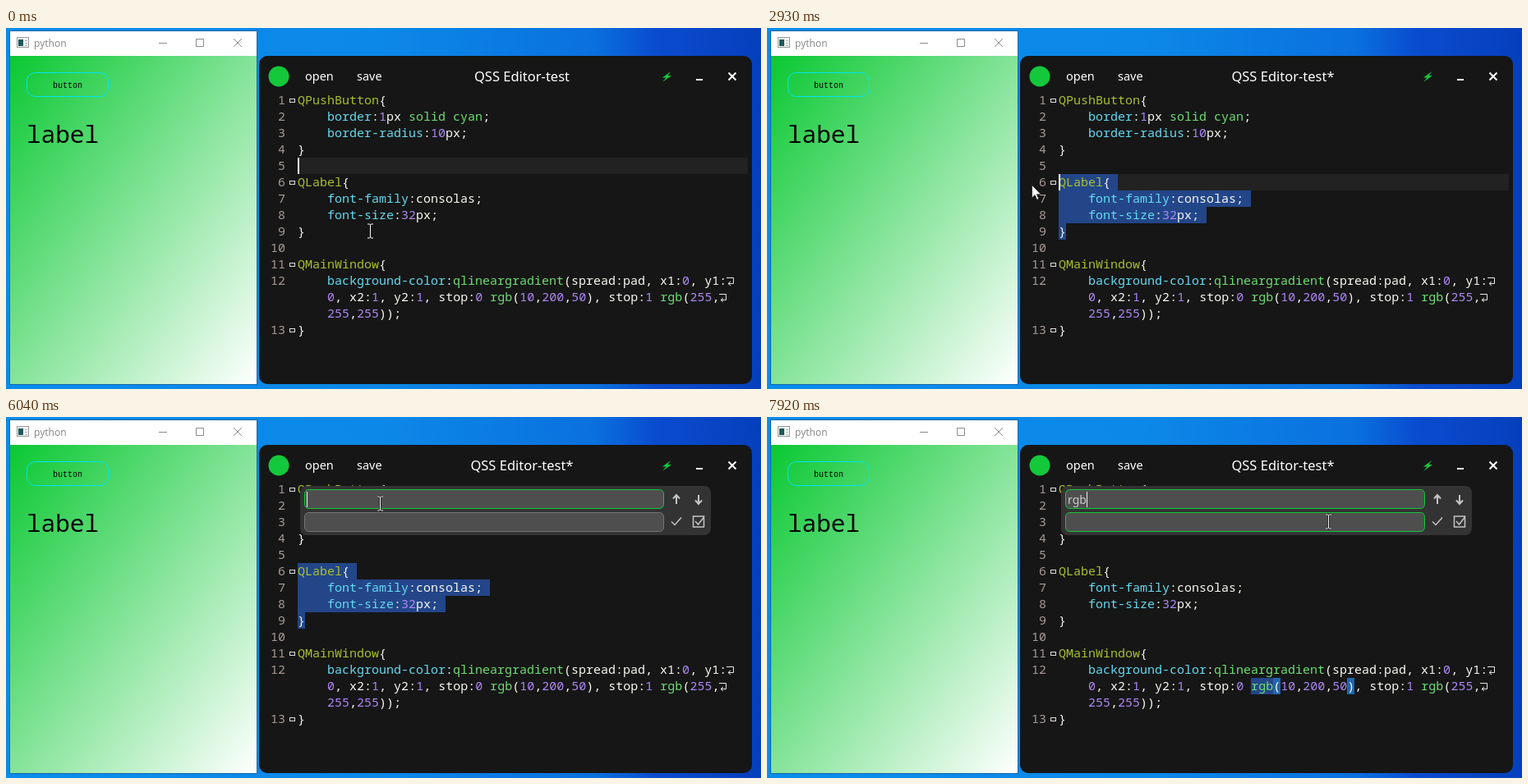
Animation, 919 px wide and 440 px high, one loop 7.99 s. Source, as an HTML page:

```html
<!DOCTYPE html>
<html lang="en">
<head>
<meta charset="utf-8">
<title>QSS Editor</title>
<style>
  html, body { margin: 0; width: 100%; height: 100%; overflow: hidden; background: #0a7fe0; }
  svg { display: block; width: 919px; height: 440px; }
  text { white-space: pre; }
  .code { font: 15px "Noto Sans Mono", monospace; fill: #f8f8f2; }
  .num { fill: #a89a96; text-anchor: end; }
  .ui { font-family: "Noto Sans", "Open Sans", sans-serif; fill: #fff; }
  .small { font: 10px "Liberation Mono", monospace; }
  .big { font: 29.33px "Noto Sans Mono", monospace; }
  .ime { font: 19px "Noto Sans CJK SC", "Noto Sans CJK", sans-serif; fill: #111; }
  .line { fill: none; }
  .comment { fill: #7b7768; }
</style>
</head>
<body>
<svg viewBox="0 0 919 440" xmlns="http://www.w3.org/2000/svg">
  <defs>
    <linearGradient id="sky">
      <stop offset="0" stop-color="#0a8cec"/>
      <stop offset=".5" stop-color="#0c88e8"/>
      <stop offset=".78" stop-color="#0a70de"/>
      <stop offset=".86" stop-color="#0a4ccf"/>
      <stop offset="1" stop-color="#063fbc"/>
    </linearGradient>
    <linearGradient id="form" x2="1" y2="1">
      <stop stop-color="rgb(10,200,50)"/>
      <stop offset="1" stop-color="#fff"/>
    </linearGradient>
  </defs>

  <rect width="919" height="440" fill="url(#sky)"/>

  <!-- preview window -->
  <rect x="4" y="3" width="302" height="432" fill="#1668a8"/>
  <rect x="5" y="4" width="300" height="30" fill="#fff"/>
  <rect x="5" y="34" width="300" height="400" fill="url(#form)"/>
  <g shape-rendering="crispEdges">
    <rect x="13.5" y="11.5" width="14" height="12" fill="#f4f4f4" stroke="#9a9a9a"/>
    <rect x="15" y="14" width="6" height="8" fill="#1d5a5c"/>
    <path d="M23 15h3M23 18h3M23 21h3" stroke="#b5b5b5"/>
  </g>
  <text class="ui" x="34" y="23" style="font-size:12px;fill:#8c8c8c">python</text>
  <path class="line" d="M186 18.5h10M231.5 13.5h9v9h-9zM277 13l10 10M287 13l-10 10" stroke="#8a8a8a"/>
  <rect class="line" x="25.5" y="54.5" width="99" height="29" rx="10" stroke="#00e5f0"/>
  <text class="small" x="57" y="73">button</text>
  <text class="big" id="bigLabel" x="25" y="140">label</text>
  <text class="small" id="smallLabel" x="25" y="133">label</text>

  <!-- editor window -->
  <rect x="308" y="34" width="600" height="400" rx="10" fill="#161616"/>
  <circle cx="332" cy="59" r="12.5" fill="#14c83c"/>
  <g class="ui" font-size="14.5">
    <text x="364" y="64">open</text>
    <text x="427" y="64">save</text>
    <text id="title" x="628" y="65" text-anchor="middle" font-size="16.5"></text>
  </g>
  <path d="M809 53l-10 7.500h4.500l-4.500 5.500 11-8h-4.500z" fill="#14c83c"/>
  <path class="line" d="M840 63h8M879.500 54.500l9 9M888.500 54.500l-9 9" stroke="#fff" stroke-width="2"/>

  <rect id="rowBar" x="355" width="548" height="20" fill="#222"/>
  <g id="selection" fill="#234689"></g>
  <g id="match">
    <path d="M589 318h27v20h-27z" fill="#234689"/>
    <path d="M616 318h9v20h-9zM706 318h9v20h-9z" fill="#1f67b0"/>
  </g>
  <g id="sheet" class="code"></g>
  <g id="rule" class="code"></g>
  <g id="commented" class="code comment"></g>
  <path class="line" d="M877 304.500h8.500v7h-6M882 309l-3 2.500 3 2.500M868 324.500h8.500v7h-6M873 329l-3 2.500 3 2.500" stroke="#e8e8e8"/>
  <rect id="caret" x="355" width="2" height="20" fill="#fff"/>

  <!-- find and replace -->
  <g id="panel">
    <rect x="358" y="84" width="500" height="60" rx="8" fill="#333"/>
    <rect x="363.500" y="88.500" width="437" height="23" rx="5" fill="#4e4e4e" stroke="#14c83c"/>
    <rect id="field2" x="363.500" y="116.500" width="437" height="23" rx="5" fill="#4e4e4e"/>
    <g class="line" stroke="#c4c4c4" stroke-width="2">
      <path d="M816 106v-11M812 99.500l4-4.500 4 4.500M843 95v11M839 101.500l4 4.500 4-4.500"/>
      <path d="M810 127.500l4 4 8-9" stroke-width="1.500"/>
      <path d="M836.500 121h13v13h-13zM839 127l3.500 4 7-9" stroke-width="1.500"/>
    </g>
    <text id="query" class="ui" x="366" y="106" style="font-size:14px;fill:#ccc"></text>
    <path id="underline" stroke="#9aa4b4"/>
    <rect id="caret2" y="91" width="1" height="19" fill="#eee"/>
  </g>
  <g id="ime"></g>

  <!-- pointer -->
  <g id="pointer">
    <circle id="press" cx="-2" cy="-1" r="12" fill="#ff0" fill-opacity=".5"/>
    <g id="beam" class="line">
      <path d="M-3.500-8.500h2.500l1 1 1-1h2.500M0-7.500v15M-3.500 8.500h2.500l1-1 1 1h2.500" stroke="#222" stroke-width="2.500"/>
      <path d="M-3.500-8.500h2.500l1 1 1-1h2.500M0-7.500v15M-3.500 8.500h2.500l1-1 1 1h2.500" stroke="#f2f2f2"/>
    </g>
    <path id="arrow" d="M0 0v15.500l3.600-3.400 2.500 5.700 2.300-1-2.500-5.500h5z" fill="#fff" stroke="#222" stroke-width=".8"/>
  </g>
</svg>

<script>
const LOOP = 7990, LEFT = 355, CHAR = 9, TOP = 78, ROW = 20;
const $ = id => document.getElementById(id);
const show = (id, on) => $(id).style.display = on ? '' : 'none';
const rowTop = row => TOP + (row - 1) * ROW;

const sheet = [
  'QPushButton{', '    border:1px solid cyan;', '    border-radius:10px;', '}', '',
  'QLabel{', '    font-family:consolas;', '    font-size:32px;', '}', '',
  'QMainWindow{',
  '    background-color:qlineargradient(spread:pad, x1:0, y1:',
  '    0, x2:1, y2:1, stop:0 rgb(10,200,50), stop:1 rgb(255,',
  '    255,255));', '}'
];
const muted = ['/*QLabel{*/', '/*  font-family:consolas;*/', '/*  font-size:32px;*/', '/*}*/'];

const TOKEN = /(Q\w+)|(border-radius|border|font-family|font-size|background-color)|(solid|cyan|qlineargradient|rgb)|([xy]\d)|(\d+)/g;
const COLORS = ['#a9bf30', '#66d9ef', '#6fdc74', '#f8f8f2', '#ae88f5'];
const paint = line => line.replace(TOKEN, (word, ...groups) =>
  `<tspan fill="${COLORS[groups.slice(0, 5).findIndex(Boolean)]}">${word}</tspan>`);
const codeText = (html, row) => `<text x="${LEFT}" y="${rowTop(row) + 15}">${html}</text>`;

function buildEditor() {
  let number = 0, fixed = '', rule = '';
  sheet.forEach((line, i) => {
    const row = i + 1, y = rowTop(row);
    if (row < 13 || row > 14) fixed += `<text class="num" x="340" y="${y + 15}">${++number}</text>`;
    if (line[0] === 'Q' || row === 15)
      fixed += `<rect class="line" x="345.500" y="${y + 8.5}" width="6" height="4" stroke="#ddd"/>`;
    if (row > 5 && row < 10) rule += codeText(paint(line), row);
    else fixed += codeText(paint(line), row);
  });
  $('sheet').innerHTML = fixed;
  $('rule').innerHTML = rule;
  $('commented').innerHTML = muted.map((line, i) => codeText(line, i + 6)).join('');
}

// Candidate bar: words laid out at an even pitch after the typed letters.
function candidateBar(words, pitch, right) {
  const cells = words.map((word, i) => {
    const x = 379 + i * pitch;
    return `<text class="ime" x="${x}" y="140" style="fill:#666">${i + 1}</text>
      <text class="ime" x="${x + 19}" y="140">${word}</text>`;
  }).join('');
  const a = right - 115, b = right - 50;
  return `<rect x="366.500" y="111.500" width="${right - 367}" height="44" fill="#dfdfdf" stroke="#c4c4c4"/>
    <rect x="367" y="112" width="${pitch}" height="43" fill="#b2e4ff"/>${cells}
    <path d="M${a + .5} 112v43M${b + .5} 112v43" stroke="#c2c2c2"/>
    <g class="line" stroke-width="1.400" stroke="#222">
      <path d="M${a + 18} 128l-5 5.500 5 5.500" stroke="#999"/>
      <path d="M${a + 48} 128l5 5.500-5 5.500"/>
      <circle cx="${right - 25}" cy="133" r="7.500"/>
      <path d="M${right - 29} 135q4 5 8 0"/>
    </g>
    <path d="M${right - 29} 130h2v2h-2zM${right - 23} 130h2v2h-2z" fill="#222"/>`;
}
const bars = [
  [6590, candidateBar([...'人让如日若任热'], 61, 909)],
  [6910, candidateBar(['如果', '人工', '日光', '热狗', '肉感'], 82, 960)],
  [7060, candidateBar(['如果不', '人格比', '日光', '如果'], 101, 960)],
  [7460, '']
];

// time, x, y, shape (b = text beam, a = arrow)
const moves = [
  [0, 443, 247, 'b'], [70, 436, 250, 'b'], [150, 418, 254, 'b'], [230, 402, 256, 'b'],
  [310, 400, 255, 'b'], [390, 392, 247, 'b'], [470, 376, 237, 'b'], [550, 358, 228, 'b'],
  [620, 343, 217, 'b'], [690, 331, 208, 'b'], [770, 325, 202, 'b'], [840, 323, 199, 'b'],
  [920, 323, 195, 'b'], [990, 323, 191, 'b'], [1220, 322, 191, 'a'],
  [3940, 340, 197, 'a'], [4010, 372, 201, 'a'], [4090, 410, 198, 'a'], [4170, 440, 190, 'a'],
  [4250, 455, 180, 'a'], [4320, 453, 170, 'b'], [4400, 450, 154, 'b'], [4550, 449, 148, 'b'],
  [4630, 450, 141, 'a'], [4710, 452, 127, 'b'], [4790, 454, 114, 'a'], [4870, 455, 108, 'b'],
  [4960, 455, 105, 'b'], [7840, 590, 118, 'b'], [7920, 683, 127, 'b']
];
const queries = [[0, ''], [6590, 'r'], [6820, 'rg'], [7060, 'rgb']];
const caretX = { '': 366, r: 371, rg: 380, rgb: 389 };

const at = (steps, t) => steps.filter(step => step[0] <= t).pop();
const within = (t, ...spans) => spans.some(([from, to]) => t >= from && t < to);

// The drag is anchored after the closing brace on row 9.
function dragStart(t, x, y) {
  if (t < 230) return { row: 5, col: 0 };
  if (t >= 990) return { row: 6, col: 0 };
  const row = Math.min(9, Math.floor((y - TOP) / ROW) + 1);
  const col = Math.round((x - LEFT) / CHAR);
  return { row, col: Math.max(0, Math.min(sheet[row - 1].length, col)) };
}

function selectionRects(start, comment) {
  let html = '';
  for (let row = start.row; row <= 9; row++) {
    const line = comment ? muted[row - 6] : sheet[row - 1];
    const from = row === start.row ? start.col : 0;
    const to = line.length + (row < 9 ? 1 : 0);
    html += `<rect x="${LEFT + from * CHAR}" y="${rowTop(row)}" width="${(to - from) * CHAR}" height="20"/>`;
  }
  return html;
}

function draw(t) {
  const [, x, y, shape] = at(moves, t);
  const comment = within(t, [1920, 2850]);
  const start = dragStart(t, x, y);
  const query = at(queries, t)[1];
  const editing = t < 4400;

  $('pointer').setAttribute('transform', `translate(${x + .5} ${y + .5})`);
  show('beam', shape === 'b');
  show('arrow', shape === 'a');
  show('press', within(t, [230, 1220], [5010, 5110]));

  $('title').textContent = 'QSS Editor-test' + (t < 1920 ? '' : '*');
  const shrunk = within(t, [1920, 2930]);
  show('bigLabel', !shrunk);
  show('smallLabel', shrunk);
  show('rule', !comment);
  show('commented', comment);

  $('selection').innerHTML = within(t, [230, 7460]) ? selectionRects(start, comment) : '';
  show('match', t >= 7460);
  show('rowBar', editing);
  $('rowBar').setAttribute('y', rowTop(start.row));
  show('caret', editing && !within(t, [1390, 1920], [2470, 2850], [3480, 4010]));
  $('caret').setAttribute('x', LEFT + start.col * CHAR);
  $('caret').setAttribute('y', rowTop(start.row));

  show('panel', !editing);
  $('field2').setAttribute('stroke', within(t, [4710, 4790], [7840, LOOP]) ? '#14c83c' : '#747474');
  $('query').textContent = query;
  $('caret2').setAttribute('x', caretX[query]);
  show('caret2', !within(t, [4940, 5010], [5490, 6040]));
  $('underline').setAttribute('d', `M366 108.500H${caretX[query]}`);
  show('underline', within(t, [6590, 7460]));
  const bar = at(bars, t);
  $('ime').innerHTML = bar ? bar[1] : '';
}

// Every time at which something on the stage changes.
const cuts = [...new Set([
  ...[moves, bars, queries].flat().map(step => step[0]),
  1390, 1920, 2470, 2850, 2930, 3480, 4940, 5010, 5110, 5490, 6040
])].sort((a, b) => a - b);

buildEditor();
const began = performance.now();
let shown = -1;
function tick() {
  const t = (performance.now() - began) % LOOP;
  const cut = cuts.filter(c => c <= t).pop();
  if (cut !== shown) draw(shown = cut);
  requestAnimationFrame(tick);
}
tick();
</script>
</body>
</html>
```
